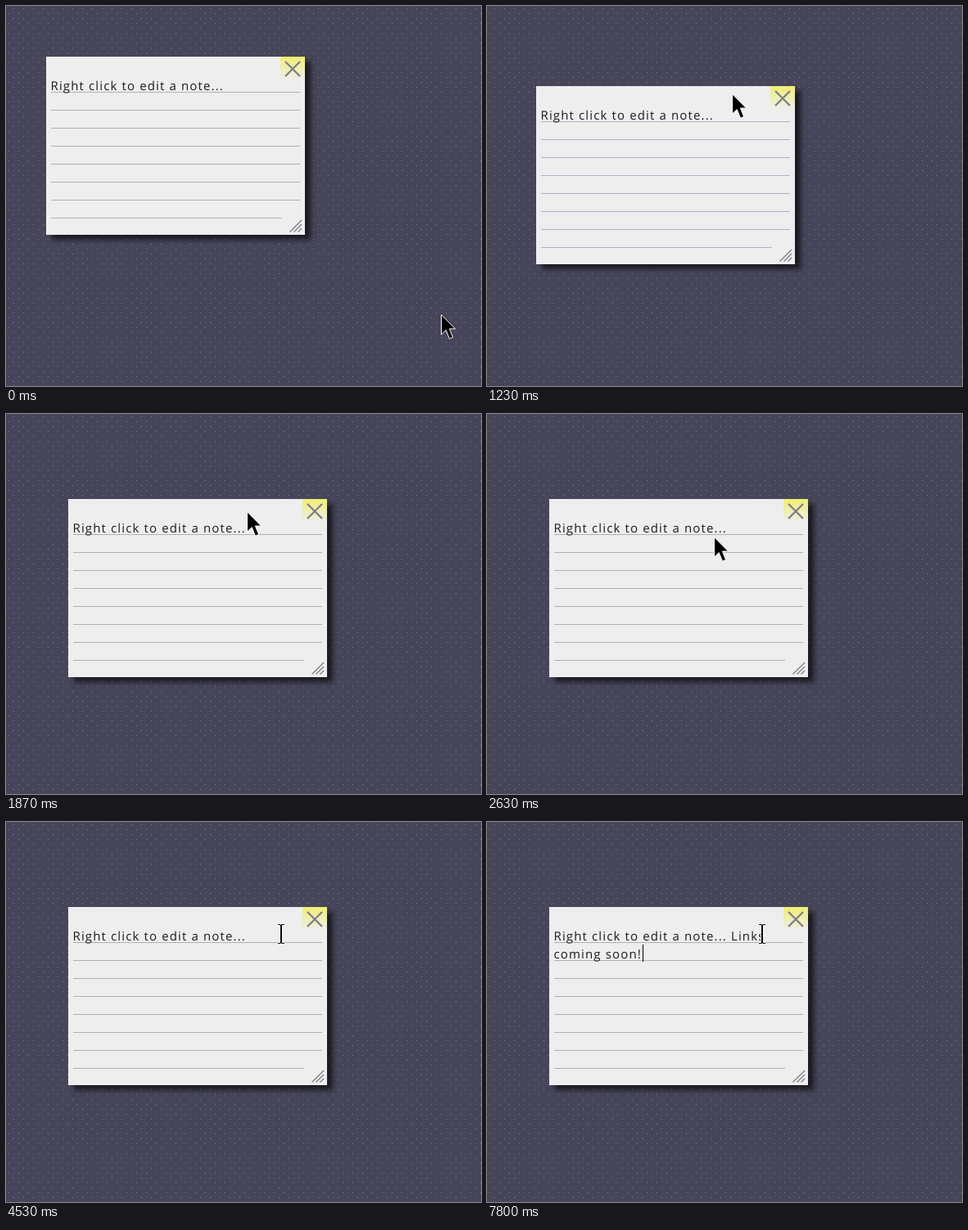
Animation of 580x465 px, one loop 8 s. Source, as an HTML page:

```html
<!DOCTYPE html>
<html lang="en">
<head>
<meta charset="utf-8">
<title>Sticky note</title>
<style>
html, body { margin: 0; width: 100%; height: 100%; overflow: hidden; }
body { position: relative; background: #464559; }
#dots { position: absolute; inset: 0; width: 100%; height: 100%; }
#note {
  position: absolute; left: 0; top: 0; width: 316px; height: 218px;
  background: #eee;
  box-shadow: 7px 6px 6px rgba(0, 0, 0, .62);
  --rule: #b0b0b0;
}
#note.drag { --rule: #b0b0c6; }
#note svg { position: absolute; left: 0; top: 0; }
#rules { stroke: var(--rule); }
.close {
  position: absolute; right: 0; top: 0; width: 30px; height: 28px;
  background: linear-gradient(#f1ee72, #eee);
}
#text {
  position: absolute; left: 5.5px; top: 25px;
  font: 15px/22px "Open Sans", "Noto Sans", sans-serif;
  letter-spacing: 1.14px; white-space: pre; color: #1c1c1c;
  text-rendering: geometricPrecision;
}
#caret { position: absolute; left: 0; top: 0; width: 1px; height: 21px; background: #000; }
.cursor { position: absolute; left: 0; top: 0; overflow: visible; }
</style>
</head>
<body>
<svg id="dots">
  <defs>
    <pattern id="grid" width="12" height="12" patternUnits="userSpaceOnUse">
      <path d="M9 3h1v1h-1zM3 9h1v1h-1z" fill="#828196"/>
    </pattern>
  </defs>
  <rect width="100%" height="100%" fill="url(#grid)"/>
</svg>
<div id="note">
  <div class="close"></div>
  <svg width="316" height="218" fill="none">
    <path id="rules"/>
    <path d="M292 6l18 18M310 6l-18 18" stroke="#808088" stroke-width="2.4"/>
    <path d="M297.5 214.5l14.5-14.5M302.5 214.5l9.5-9.5M307.5 214.5l4.5-4.5" stroke="#7c7c8a" stroke-width="1.3"/>
  </svg>
  <div id="text"></div>
</div>
<div id="caret"></div>
<svg class="cursor" id="arrow" width="18" height="31">
  <path d="M.5 .8V25L6.2 19.6L10.5 30.2L14.6 28.4L10.4 18H17.6Z" fill="#000" stroke="#fff"/>
</svg>
<svg class="cursor" id="beam" width="1" height="1" fill="none">
  <path d="M-4-11.5H-1.5L0-10.5L1.5-11.5H4M-4 11.5H-1.5L0 10.5L1.5 11.5H4M0-10.5V10.5" stroke="#fff" stroke-width="3.6"/>
  <path d="M-4-11.5H-1.5L0-10.5L1.5-11.5H4M-4 11.5H-1.5L0 10.5L1.5 11.5H4" stroke="#000" stroke-width="1.2"/>
  <path d="M0-11V11" stroke="#000" stroke-width="2"/>
</svg>
<script>
const LOOP = 8000;
const $ = id => document.getElementById(id);
const [note, text, caret, arrow, beam] = ['note', 'text', 'caret', 'arrow', 'beam'].map($);

// time, x, y
const notePath = [
  [985, 49, 62], [1030, 55, 65], [1430, 65, 131], [1600, 76, 104]
];
const pointerPath = [
  [30, 531, 377], [830, 286, 72],
  [985, 286, 72], [1030, 293, 75], [1430, 304, 138], [1600, 312, 110],
  [1780, 312, 110], [2200, 163, 186], [2630, 277, 150],
  [2800, 233, 139], [3130, 268, 159],
  [3380, 268, 159], [3600, 296, 172],
  [3980, 296, 172], [4530, 336, 137]
];

// time, typed characters, caret x
const typing = [
  [5070, '', 293], [5370, ' ', 298], [5770, 'L', 307], [5930, 'i', 312],
  [6130, 'nk', 331], [6300, 's', 338], [6570, ' ', 344], [6665, 'c', 352],
  [6760, 'o', 363], [6855, 'm', 115], [6950, 'i', 120], [7045, 'n', 130],
  [7140, 'g', 140], [7235, ' ', 146], [7330, 's', 154], [7400, 'o', 164],
  [7485, 'o', 174], [7570, 'n', 184], [7800, '!', 190]
];
const FIRST = 'Right click to edit a note...';
const WRAP = 6855;

$('rules').setAttribute('d', Array.from({ length: 8 }, (_, i) =>
  `M6 ${43.5 + 22 * i}H${i < 7 ? 310 : 288}`).join(''));

function at(path, t) {
  const i = path.findIndex(p => p[0] > t);
  if (i === 0) return path[0].slice(1);
  if (i < 0) return path[path.length - 1].slice(1);
  const a = path[i - 1], b = path[i];
  const u = (t - a[0]) / (b[0] - a[0]);
  const e = u * u * (3 - 2 * u);
  return [1, 2].map(k => Math.round(a[k] + (b[k] - a[k]) * e));
}

function place(el, [x, y]) {
  el.style.transform = `translate(${x}px, ${y}px)`;
}

function show(el, on) {
  el.style.visibility = on ? 'visible' : 'hidden';
}

function render(t) {
  place(note, at(notePath, t));
  note.classList.toggle('drag', t >= 985 && t < 1600);

  const tip = at(pointerPath, t);
  place(arrow, tip);
  place(beam, tip);
  show(arrow, t < 4050);
  show(beam, t >= 4050);

  const done = typing.filter(k => k[0] <= t);
  const typed = done.map(k => k[1]).join('');
  const wrapped = t >= WRAP;
  const body = FIRST + (wrapped ? typed.replace('s c', 's\nc') : typed);
  if (text.textContent !== body) text.textContent = body;
  show(caret, done.length > 0);
  if (done.length) place(caret, [done[done.length - 1][2], wrapped ? 150 : 128]);
}

const start = performance.now();
function tick() {
  render((performance.now() - start) % LOOP);
  requestAnimationFrame(tick);
}
render(0);
requestAnimationFrame(tick);
</script>
</body>
</html>
```
